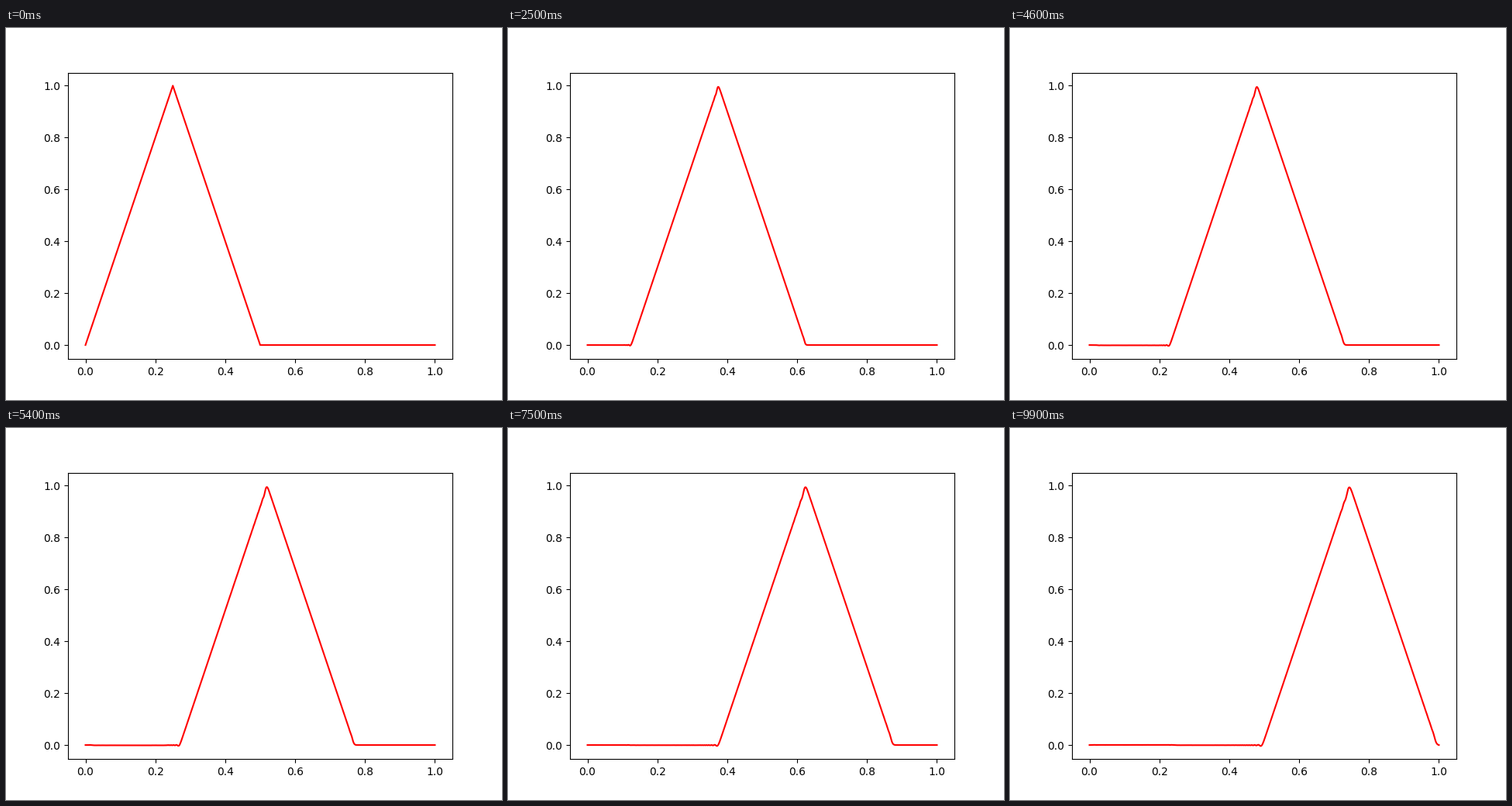
Recreate the animation shown at these times as a matplotlib script. Size 640 px wide and 480 px high, loop 10000 ms.

```python
import numpy as np
import matplotlib.pyplot as plt
from matplotlib.animation import ArtistAnimation

CELLS = 1000
COURANT = 0.5
STEPS_PER_FRAME = 10
FRAMES = 100

x = np.linspace(0, 1, CELLS + 1)
dt = COURANT / CELLS


def triangle(s):
    return np.clip(1 - np.abs(4 * s - 1), 0, None)


def step(prev, cur):
    """Leapfrog step of the wave equation with fixed ends."""
    new = np.zeros_like(cur)
    bend = cur[2:] - 2 * cur[1:-1] + cur[:-2]
    new[1:-1] = 2 * cur[1:-1] - prev[1:-1] + COURANT**2 * bend
    return cur, new


def solve():
    """Yield the pulse travelling right, one state per frame."""
    prev, cur = triangle(x + dt), triangle(x)
    nxt = triangle(x - dt)
    yield cur
    prev, cur = cur, nxt
    for _ in range(FRAMES - 1):
        for _ in range(STEPS_PER_FRAME):
            prev, cur = step(prev, cur)
        yield prev


fig, ax = plt.subplots(figsize=(6.4, 4.8), dpi=100)
# Plotting every state lets the axes scale to the whole run.
artists = [ax.plot(x, u, color="red", lw=1.5) for u in solve()]

anim = ArtistAnimation(fig, artists, interval=100, repeat=True, repeat_delay=0)
plt.show()
```
